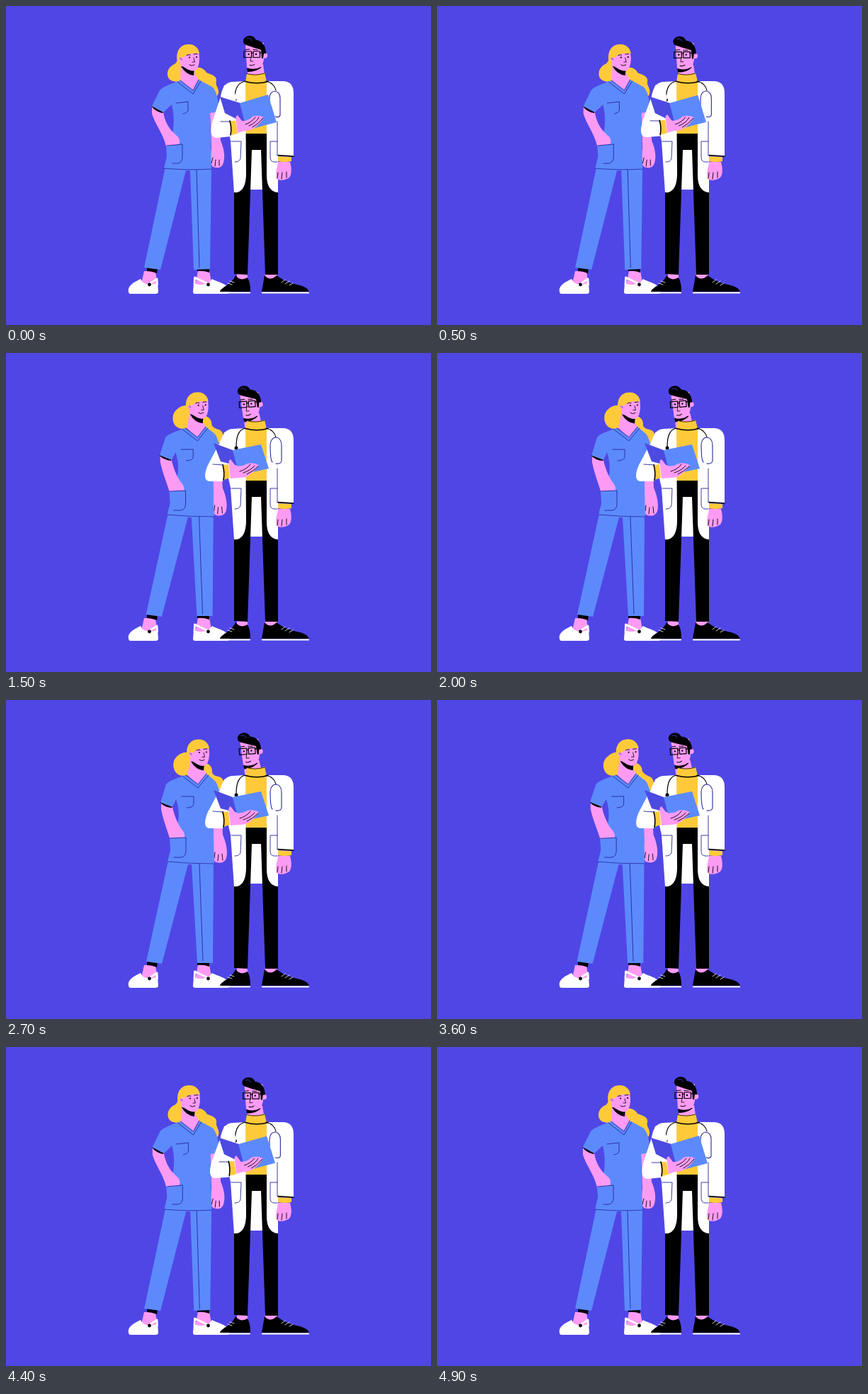
Recreate the animation shown at these times as an HTML page with a canvas. Size 600 px wide and 450 px high, loop 5 s.

```html
<!DOCTYPE html>
<html lang="en">
<head>
<meta charset="utf-8">
<title>Nurse and doctor</title>
<style>
html, body { margin: 0; width: 100%; height: 100%; overflow: hidden; background: #5046e6; }
canvas { display: block; width: 600px; height: 450px; }
</style>
</head>
<body>
<canvas id="stage" width="600" height="450"></canvas>
<script>
const ctx = document.getElementById('stage').getContext('2d');
const LOOP = 5000, STEP = 100;
const BG = '#5046e6', SKIN = '#fd9bf4', BLUE = '#5c8afd', YELLOW = '#ffca3a',
      NAVY = '#28279b', BLACK = '#000', WHITE = '#fff', PAGE = '#4d4ae2';

const clamp = x => Math.min(1, Math.max(0, x));
const ease = x => x < .5 ? 4 * x ** 3 : 1 - 4 * (1 - x) ** 3;
const ramp = (t, from, to) => ease(clamp((t - from) / (to - from)));

// Blend two path strings that share the same commands.
function blend(a, b, p) {
  const ends = b.match(/-?\d+(\.\d+)?/g);
  let i = 0;
  return a.replace(/-?\d+(\.\d+)?/g, n => (+n + (ends[i++] - n) * p).toFixed(2));
}
function fill(color, d) {
  ctx.fillStyle = color;
  ctx.fill(new Path2D(d));
}
function line(d, color = NAVY, width = .9) {
  ctx.strokeStyle = color;
  ctx.lineWidth = width;
  ctx.stroke(new Path2D(d));
}
function dot(x, y, r, color = BLACK) {
  ctx.fillStyle = color;
  ctx.beginPath();
  ctx.arc(x, y, r, 0, 7);
  ctx.fill();
}

function nurseLegs(p) {
  const m = (a, b) => blend(a, b, p);
  fill(SKIN, 'M195 374H211L214 396H190Z');
  fill(SKIN, 'M271 373H287L291 396H267Z');
  fill(BLACK, 'M199 368H214L213 377Q205 374 199 374Z');
  fill(BLACK, 'M270 369H287V376Q279 373 270 374Z');
  fill(WHITE, 'M173 403C171 394 182 389 190 385L193 390Q204 396 214 390L215 403Q215 406 211 406H176Q173 406 173 403Z');
  fill(WHITE, 'M264 403L265 391Q277 396 287 390L291 385C299 390 314 391 316 403L314 406H267Q264 406 264 403Z');
  line('M202.5 392L213 385L213.5 393M285.5 392L266.5 383L266 393', WHITE, 2.8);
  dot(202.5, 393, 2.4);
  dot(285.5, 393, 2.4);
  fill(BLUE, m('M225 227L195 369L218 372L254 232L260 232L265 372L288 371L290 227Z',
               'M229 227L198 369L220 372L257 232L262 232L270 371L292 371L293 227Z'));
  line(m('M269 231L273 369', 'M273 231L278 368'));
}

function nurseBody(p) {
  const m = (a, b) => blend(a, b, p);
  fill(YELLOW, m('M246 72C242 74 242 79 238 82C225 87 225 104 236 106C244 108 248 106 254 104L266 90L250 70Z',
                 'M259 74C252 73 246 75 242 79C233 86 235 102 245 106C255 109 262 103 268 103L280 90L262 70Z'));
  fill(YELLOW, m('M262 88C272 84 280 88 283 94C290 97 298 98 297 106C295 112 300 114 300 121C300 127 296 130 292 127C286 122 290 118 284 115C276 112 270 106 264 102Z',
                 'M276 88C284 88 291 92 291 100C290 104 294 107 300 108C307 109 308 116 307 120C306 126 302 128 297 126C292 122 290 112 284 107C280 106 278 104 276 102Z'));
  fill(SKIN, m('M288 148L301 148L303 190C309 204 309 214 307 221C305 229 298 229 292 227C288 222 288 214 290 200Z',
               'M292 148L304 148L306 190C312 204 313 216 311 223C309 230 301 231 295 228C291 222 292 214 293 200Z'));
  line(m('M292 214L290 222M296 217L295 226M301 217L301 225', 'M295 215L294 223M300 218L299 227M305 217L306 226'), BLACK);
  fill(SKIN, m('M247 82L246 105L264 120L272 104L266 95L266 84Z', 'M261 82L256 106L271 120L283 104L277 95L278 84Z'));
  fill(BLUE, m('M246 105C236 109 222 113 217 119L206 141L222 150L234 139C238 155 237 170 235 180L223 229Q255 232 290 230L288 151L301 149C300 134 298 120 291 114L272 104L264 119Z',
               'M254 106C245 109 231 113 226 119L218 145L235 151L240 140C245 155 245 170 240 182L228 228Q260 231 294 231L292 151L304 149C303 134 300 120 295 114L283 104L271 119Z'));
  line(m('M223 229Q255 232 290 230', 'M228 228Q260 231 294 231'), NAVY, .8);
  line(m('M246 105L264 119L272 104M242 107L264 124L275 106', 'M254 106L271 119L283 104M250 108L271 124L286 106'));
  line(m('M240 137L257 135L257 147Q256 151 250 152', 'M248 136L265 136L265 147Q264 152 255 152'));

  fill(SKIN, m('M206 142L222 150C225 166 231 174 240 182Q246 186 245 194L239 198L226 198C222 180 211 168 206 152Z',
               'M219 145L235 151C238 165 244 178 250 185Q253 190 252 195L245 198L232 198C228 184 222 170 219 154Z'));
  fill(BLACK, m('M205 141L222 150L221 151Q211 149 205 141Z', 'M217 144L235 151L234 152Q223 151 217 144Z'));
  fill(BLUE, m('M226 197L248 195L248 215L228 225Z', 'M231 195L254 194L254 215L233 225Z'));
  line(m('M227 197L249 195L249 213Q249 221 242 222L235 222', 'M231 195L254 194L254 213Q254 221 247 222L237 222'));
}

function nurseHead(p) {
  ctx.save();
  ctx.translate(14 * p, 1 + 1.5 * p);
  fill(BLACK, 'M247 84L266 86L265 97Q254 96 247 84Z');
  fill(SKIN, 'M246 65H272C274 72 273 82 270 87C268 92 260 91 254 87L246 82Z');
  fill(YELLOW, 'M242 78C239 64 245 53 258 53C267 53 272 59 273 66C263 65 256 66 252 70C249 73 245 74 242 78Z');
  dot(247, 74, 2.6, SKIN);
  line('M245.5 73Q248 72 248 75', NAVY, .7);
  line('M255 68.5Q258 67 260 68M265 67L270 66.5', BLACK, .9);
  if (p > .2 && p < .5) line('M255 72.5H260M265 72H270', BLACK, 1);
  else { dot(259, 71.5, 1.1); dot(269, 71, 1.1); }
  line('M265 72L266.5 78H263', BLACK, .8);
  line('M259 82Q262 84.5 266 82', BLACK, .9);
  ctx.restore();
}

function shoe(d, sole, laces) {
  fill(BLACK, d);
  line(sole, WHITE, 2.2);
  line(laces, WHITE, .8);
}

function doctorBody() {
  fill(WHITE, 'M340 200H368V259H340Z');
  fill(SKIN, 'M326 376H340L342 387H326Z');
  fill(SKIN, 'M366 376H382L384 386H365Z');
  shoe('M302 403C304 396 318 394 324 380Q331 389 341 383Q345 390 345 403Z',
       'M303 404.5H344', 'M316 388L322 390M313 391L319 393');
  shoe('M361 403L365 380Q373 389 382 380C393 389 406 392 415 394Q426 397 428 403Z',
       'M362 404.5H427', 'M389 390L394 386M394 392L400 388M400 394L405 391');
  fill(BLACK, 'M338 179H369L384 260V379H366L360 203H347L341 379L322 378V258L338 230Z');
  fill(YELLOW, 'M337 107H369V180H337Z');
  fill(WHITE, 'M338 106L320 107L308 112L303 128L317 190L322 263H326Q339 260 339 236Z');
  fill(WHITE, 'M368 106H392Q406 107 406 123V212L384 210.5V263Q368 262 368 238Z');
  line('M383 163V211');
  line('M384 210.5L406 212', BLACK, 1.4);
  fill(YELLOW, 'M384 212L403 213V219Q393 221 384 219Z');
  fill(SKIN, 'M384 220H401C404 231 403 238 400 242C394 246 387 247 382 244Q380 236 383 226Z');
  line('M384 235L383 243M390 235L389 244M396 234L396 242', BLACK);
  line('M318 191H332L331 215Q330 220 323 220');
  line('M383 191H373V213Q373 220 379 220H383');
}

function collar() {
  fill(YELLOW, 'M340 95Q352 99 365 94L368 107Q354 111 338 107Z');
  line('M338 106.5Q354 111 370 106.5', BLACK, 1.3);
  line('M340 95.5Q352 99 365 95', BLACK, .8);
}

function stethoscope(p) {
  const m = (a, b) => blend(a, b, p);
  line(m('M338 106C328 108 323 115 323 131', 'M338 106C329 108 325 116 325 133'), BLACK, 1.2);
  dot(323 + 2 * p, 132 + 2 * p, 2.5);
  line('M367 106Q379 109 381 119', BLACK, 1.2);
  line(m('M375 154Q371 151 372 130C372 117 387 117 387 130L387 154Q386 158 380 156',
         'M376 154Q373 151 373 129C374 115 389 116 389 130L389 152Q388 157 381 156'), NAVY, 1.1);
}

function doctorArm(p) {
  const m = (a, b) => blend(a, b, p);
  fill(WHITE, m('M319 107C309 108 305 116 303 128L291 164C288 178 289 186 298 186L317 184L319 163L325 130Z',
                'M319 107C309 108 306 116 302 126L285 158C279 172 280 181 288 181L308 181L310 158L324 130Z'));
  line(m('M303 163L317 163', 'M292 157L308 158'));
  fill(PAGE, m('M302 128L331 137L338 166L309 151Z', 'M293 127L320 137L330 160L303 153Z'));
  fill(BLUE, m('M330 137L370 125L382 164L340 175Z', 'M320 137L360 129L371 163L329 172Z'));
  fill(YELLOW, m('M316 162L324 162L327 180L318 182Z', 'M307 158L314 157L316 176L307 179Z'));
  line(m('M316 162Q319 172 317 182', 'M306 158Q309 168 307 180'), BLACK, 1.6);
  fill(SKIN, m('M325 164Q323 155 327 154L333 162Q341 163 348 156Q356 153 364 157Q360 165 352 171Q346 176 337 176L327 179Z',
               'M315 160Q313 151 317 150L324 159Q332 161 341 156Q349 154 357 158Q353 165 345 171Q340 176 329 176L317 177Z'));
  line(m('M338 167Q347 164 352 157M343 169Q353 165 357 157M348 171Q357 166 363 158',
         'M330 167Q340 164 345 157M335 169Q345 166 351 159M340 171Q349 167 356 160'), BLACK);
}

function doctorHead(p) {
  ctx.save();
  ctx.translate(352 - 4.5 * p, 95 + 3.5 * p);
  ctx.rotate(-.08 * p);
  ctx.translate(-352, -95);
  dot(365.5, 70, 3.7, SKIN);
  fill(SKIN, 'M341 82H363L366 104H341Z');
  fill(BLACK, 'M340 85L361 86Q354 93 341 93Z');
  fill(SKIN, 'M338 52H364V76Q362 86 355 88Q346 90 340 87Z');
  fill(BLACK, 'M339 55C333 53 333 43 344 42C350 42 352 46 353 48C361 49 367 55 367 67L364 67L363 74H361L360 62C355 60 347 58 339 55Z');
  line('M340 46Q346 44 347 49', BG, .7);
  ctx.strokeStyle = BLACK;
  ctx.lineWidth = 1.2;
  ctx.strokeRect(336, 64, 10.5, 8.5);
  ctx.strokeRect(349, 64, 9.5, 8.5);
  line('M346.5 66.5H349M358 66H364', BLACK, 1.2);
  line('M338 61.5L344 61M349 61.5L355 62', BLACK, 1);
  dot(342.5, 68, 1.2);
  dot(353, 68, 1.2);
  line('M346 72L345 78H349', BLACK, .8);
  line('M344 83.5Q348 85 351 82.5', BLACK, 1);
  ctx.restore();
}

const start = performance.now();

function draw() {
  const elapsed = performance.now() - start;
  const t = Math.floor(elapsed % LOOP / STEP) * STEP;
  const nurse = ramp(t, 0, 2100) - ramp(t, 2900, 4900);
  const doctor = ramp(t, 0, 1400) - ramp(t, 3500, 4900);
  ctx.fillStyle = BG;
  ctx.fillRect(0, 0, 600, 450);
  ctx.lineCap = ctx.lineJoin = 'round';
  nurseLegs(nurse);
  nurseBody(nurse);
  nurseHead(nurse);
  doctorBody();
  doctorHead(doctor);
  collar();
  stethoscope(doctor);
  doctorArm(doctor);
  requestAnimationFrame(draw);
}
draw();
</script>
</body>
</html>
```
